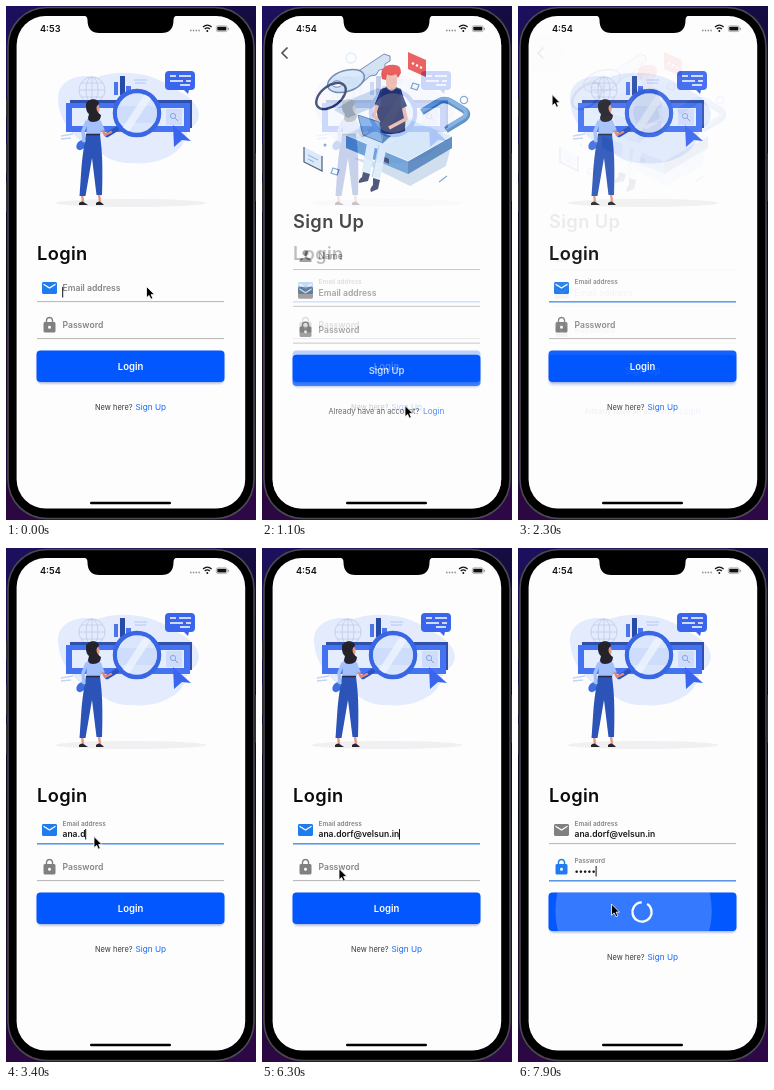
An HTML page that plays this animation: 250 by 514 pixels, repeating every 8 s.

```html
<!DOCTYPE html>
<html lang="en">
<head>
<meta charset="utf-8">
<title>Login flow</title>
<style>
html, body { margin: 0; width: 100%; height: 100%; overflow: hidden; background: #160a35; }
svg { display: block; width: 100%; height: 100%; }
text { font-family: Inter, Roboto, sans-serif; white-space: pre; }
.title { font-size: 18.3px; font-weight: 600; letter-spacing: .35px; fill: #0b0b0d; }
.label { font-size: 8.6px; font-weight: 600; fill: #858585; }
.value { font-size: 8.5px; font-weight: 600; fill: #17171a; }
.cta { font-size: 9.5px; font-weight: 600; fill: #fff; text-anchor: middle; }
.note { font-size: 7.45px; fill: #38383c; }
.link { font-size: 8.2px; fill: #1767f2; }
</style>
</head>
<body>
<svg viewBox="0 0 250 514">
<defs>
  <linearGradient id="wall" x2=".2" y2="1">
    <stop stop-color="#1d1060"/><stop offset=".5" stop-color="#0a0616"/><stop offset="1" stop-color="#2e0846"/>
  </linearGradient>
  <filter id="soft" x="-10%" y="-30%" width="120%" height="160%"><feGaussianBlur stdDeviation="1"/></filter>
  <clipPath id="screenClip"><rect x="10.6" y="10" width="228.6" height="492.5" rx="29"/></clipPath>
  <clipPath id="buttonClip"><rect id="buttonClipBox" x="30.5" y="344.5" width="188" rx="4"/></clipPath>
  <clipPath id="lens"><circle cx="131" cy="107" r="20"/></clipPath>
</defs>

<rect width="250" height="514" fill="url(#wall)"/>
<rect x="2" y="1.5" width="246" height="511" rx="39" fill="#000" stroke="#4a4a50" stroke-width="1.6"/>
<path d="M.8 94v17M.8 137v30M.8 176v30M249.2 147v48" stroke="#2c2c32" stroke-width="1.6"/>
<rect x="10.6" y="10" width="228.6" height="492.5" rx="29" fill="#fdfdfe"/>

<g clip-path="url(#screenClip)">
<g id="login">
  <!-- search illustration -->
  <path d="M52 92C52 74 72 67 92 71C112 63 148 66 166 82C197 94 200 116 181 124C181 147 152 160 126 157C104 158 95 146 84 140C66 132 52 112 52 92Z" fill="#e3ebfc"/>
  <ellipse cx="125" cy="197" rx="75" ry="4" fill="#f0f0f2"/>
  <g fill="none" stroke="#c2d0ec" stroke-width=".9">
    <circle cx="86" cy="84" r="13"/><ellipse cx="86" cy="84" rx="6" ry="13"/>
    <path d="M73 84h26M86 71v26M75 77h22M75 91h22"/>
  </g>
  <path d="M55 130l12-2M55 133l10-1M128 74h13M129 77h11" stroke="#c2d4f7" stroke-width="1.6"/>
  <path d="M108 76h4v13h-4zM120 80h5v9h-5z" fill="#4a76ec"/>
  <path d="M114 70h5v19h-5z" fill="#284aa8"/>
  <rect x="64" y="94" width="122" height="28" fill="#3050ae"/>
  <rect x="60" y="97" width="124" height="29" fill="#4472f2"/>
  <rect x="66" y="102" width="112" height="18" fill="#e4edfe"/>
  <rect x="160" y="103" width="16" height="16" fill="#cfdcfb"/>
  <path d="M169 112l3 3" stroke="#7f9ee6"/><circle cx="167" cy="110" r="2.6" fill="none" stroke="#7f9ee6" stroke-width=".9"/>
  <path d="M163 65h22q4 0 4 4v11q0 4-4 4h-2l-1 4-4-4h-15q-4 0-4-4v-11q0-4 4-4z" fill="#3a66ee"/>
  <path d="M164 70h6M173 70h12M164 75h13M180 75h5M174 79h10" stroke="#fff" stroke-width="1.7"/>
  <path d="M167 119L185 135L176 134L168 141Z" fill="#3a66ee"/>
  <path d="M114 121L101 129" stroke="#2c52bd" stroke-width="4.5" stroke-linecap="round"/>
  <circle cx="131" cy="107" r="22" fill="#dbe6fd" stroke="#3866e4" stroke-width="4.5"/>
  <g clip-path="url(#lens)">
    <path d="M108 100h46v17h-46z" fill="#cfddfc"/>
    <path d="M114 126l26-40h9l-26 40z" fill="#eff5ff" opacity=".8"/>
  </g>
  <path d="M78 134c-6 0-9 5-7 9q4 3 8-2z" fill="#3d6de0"/>
  <path d="M76 188l1 8M93 188l1 8" stroke="#e79a83" stroke-width="2.4"/>
  <path d="M80 128Q76 150 75 168L73.500 190H79.500L86 152L90.500 189H96Q97 160 95.500 142L94 128Z" fill="#2c54b8"/>
  <path d="M73 197q3-3 6 0l3 2h-9zM90 197q3-3 6 0l2 2h-8z" fill="#28242b"/>
  <path d="M81 113q7-3 13 0l1 15H80.500z" fill="#a4c0fa"/>
  <path d="M81 115L77 125L78 136" fill="none" stroke="#a4c0fa" stroke-width="3.4"/>
  <path d="M93 115L97 125" stroke="#a4c0fa" stroke-width="3.8"/>
  <path d="M97 125L99 129L105 126" fill="none" stroke="#e08a76" stroke-width="2.5" stroke-linecap="round" stroke-linejoin="round"/>
  <path d="M80 128.500h14" stroke="#222a44" stroke-width="1.500"/>
  <ellipse cx="90" cy="103" rx="3.600" ry="5.500" fill="#e79a83"/>
  <path d="M80 100C79 92 93 91 93 98C89 100 90 106 95 109Q95 116 87 116Q80 116 83 108Q80 106 80 100Z" fill="#24232a"/>

  <text class="title" x="31" y="254">Login</text>
  <g id="loginFields"></g>
  <rect id="buttonShade" x="31.500" y="346" width="186" rx="4" fill="#002a8a" opacity=".35" filter="url(#soft)"/>
  <g clip-path="url(#buttonClip)">
    <rect x="30" y="344" width="189" height="41" fill="#0257fe"/>
    <circle id="ripple" fill="#fff" opacity=".2"/>
  </g>
  <text id="cta" class="cta" x="124.500" y="363.500">Login</text>
  <circle id="loader" cx="124" cy="364" r="9.600" fill="none" stroke="#fff" stroke-width="2.300"/>
  <g id="loginNote"><text class="note" x="89" y="403.700">New here?</text><text class="link" x="129.500" y="403.800">Sign Up</text></g>
</g>

<g id="signup">
  <rect x="10" y="10" width="230" height="493" fill="#fdfdfe"/>
  <circle id="backRipple" cx="26" cy="47.500" r="19" fill="#f0f0f1"/>
  <path d="M25.500 41.500l-5.500 5.500 5.500 5.500" fill="none" stroke="#111" stroke-width="1.600"/>
  <!-- security illustration -->
  <path d="M72 104l14 8 24-10 14-12-8-8-24 10zM92 152l56 28 36-20 4-16-50 16z" fill="#c0d3e8"/>
  <path d="M92 68L122 48l6 2v5l-5 3v5l-6 1-3 5-6 1-9 8z" fill="#c5daf1" stroke="#47699c"/>
  <ellipse cx="84" cy="75" rx="19" ry="10.500" transform="rotate(-18 84 75)" fill="#cfe2f7" stroke="#47699c" stroke-width="1.500"/>
  <ellipse cx="75" cy="78" rx="5" ry="3.200" fill="#fdfdfe" stroke="#47699c"/>
  <ellipse cx="69" cy="90" rx="17" ry="10" transform="rotate(-38 69 90)" fill="none" stroke="#17224e" stroke-width="2.400"/>
  <path d="M160 106L176 96Q182 92 189 96L202 104Q208 108 202 113L184 124" fill="none" stroke="#326eaf" stroke-width="6.500"/>
  <path d="M160 105L176 95Q182 91 189 95L202 103Q206 107 202 111L184 122" fill="none" stroke="#5c99da" stroke-width="4"/>
  <path d="M84 129L146 155L190 130V142L146 168L84 142Z" fill="#4b89ce"/>
  <path d="M146 155L190 130V142L146 168Z" fill="#2f69ad"/>
  <path d="M84 129L128 106L190 130L146 155Z" fill="#d3e6fa" stroke="#eaf4ff"/>
  <path d="M119 149l8 4v5l-8-4z" fill="#17224e"/>
  <g fill="none" stroke="#d6e8fb" stroke-width="8.500" stroke-linejoin="round">
    <path d="M131 125L110 133L104 167"/>
    <path d="M136 127L121 138L114 172"/>
  </g>
  <path d="M117 139L110 171" stroke="#8db9e6" stroke-width=".8"/>
  <path d="M101 166l7 2-2 7-9 2q-1-3 3-6zM111 172l7 2-2 9-7 3q-2-3 2-7z" fill="#17224e"/>
  <path d="M119 83q11-5 20 0 6 18 4 42-13 6-27 1 1-14-3-28z" fill="#171f50"/>
  <path d="M116 97L112 109L117 117M141 99L144 113L127 122" fill="none" stroke="#f2b29f" stroke-width="3.600" stroke-linejoin="round"/>
  <path d="M119 83L113 98l6 3zM138 83l7 17-6 3z" fill="#222d67"/>
  <path d="M96 109l21 7 4 21-20-8z" fill="#6fa3df" stroke="#366eac"/>
  <path d="M121 137l8-7-9-3z" fill="#366eac"/>
  <path d="M124 68h11v9q-1 8-6 8-5-2-5-8z" fill="#f2b29f"/>
  <path d="M120 73q-3-12 7-14 13-2 12 8l-3 5-2-4q-6 3-9 0l-1 6z" fill="#e02a2a"/>
  <path d="M146 46l18 8v17l-18-8z" fill="#e42d2d"/>
  <path d="M150 57l2 1M154 59l2 1M158 61l2 1" stroke="#fff" stroke-width="2"/>
  <path d="M42 141l18 9v15l-18-9z" fill="#cfe2f7"/>
  <path d="M42 141v15l18 9v-15" fill="none" stroke="#17224e" stroke-width="1.200"/>
  <path d="M46 149l10 5M46 153l6 3" stroke="#5c99da"/>
  <g fill="none" stroke="#5c8fc9" stroke-width="1.300">
    <circle cx="89" cy="52" r="5" stroke="#d7e7f9"/><circle cx="202" cy="94" r="3.600"/>
    <path d="M151 77l6 2-2 5-6-2zM71 162l6 2-2 5-6-2zM177 176l8-6"/>
  </g>
  <circle cx="63" cy="139" r="1.500" fill="#5c8fc9"/>

  <text class="title" x="31" y="222">Sign Up</text>
  <g id="signupFields"></g>
  <rect x="31.500" y="350" width="186" height="31" rx="4" fill="#002a8a" opacity=".35" filter="url(#soft)"/>
  <rect x="30.500" y="348.700" width="188" height="31.300" rx="4" fill="#0257fe"/>
  <text class="cta" x="124.500" y="367.700">Sign Up</text>
  <text class="note" x="66.500" y="408">Already have an account?</text><text class="link" x="161" y="408.200">Login</text>
</g>
</g>

<path d="M77 9.500q4.500 0 4.500 4.500q0 13 12 13h62q12 0 12-13q0-4.500 4.500-4.500z" fill="#000"/>
<text id="clock" x="34" y="25.700" font-size="9.200" font-weight="600" fill="#111"></text>
<path d="M184 24.500h10" stroke="#8d8d8d" stroke-width="1.400" stroke-dasharray="1.500 1.300"/>
<path d="M197 21q4.300-3.700 8.600 0M198.700 23q2.600-2.200 5.200 0" fill="none" stroke="#111" stroke-width="1.300"/>
<circle cx="201.300" cy="25" r="1" fill="#111"/>
<rect x="210.300" y="19.800" width="11" height="5.800" rx="1.700" fill="none" stroke="#999" stroke-width=".7"/>
<rect x="211.300" y="20.800" width="9" height="3.800" rx=".8" fill="#111"/>
<path d="M222.600 21.800v2" stroke="#999"/>
<rect x="84" y="495.800" width="81" height="2.400" rx="1.200" fill="#000"/>
<path id="mouse" d="M0 0V11.200L2.600 8.900L4.400 12.700L6.300 11.800L4.600 8.100H8Z" fill="#000" stroke="#fff" stroke-width=".8"/>
</svg>

<script>
const LOOP = 8000, GREY = '#808080', BLUE = '#1e7cf0';
const EMAIL = 'ana.dorf@velsun.in';
const EMAIL_KEYS = [2900, 3020, 3140, 3250, 3360, 3700, 3880, 4050, 4400, 4500, 4600, 4750, 4900, 5000, 5120, 5250, 5380, 5490];
const PASS_KEYS = [6680, 6800, 6930, 7050, 7160];
// time, x, y
const MOUSE = [[0, 140.5, 280.5], [150, 140.5, 280.5], [620, 143, 399.5], [1150, 143, 399.5], [1750, 24, 51],
  [2150, 24, 51], [2750, 88, 288.5], [5700, 88, 288.5], [6200, 77, 320.5],
  [7220, 77, 320.5], [7500, 93.5, 356], [LOOP, 93.5, 356]];
const ICONS = {
  mail: 'M20 4H4c-1.1 0-2 .9-2 2v12c0 1.1.9 2 2 2h16c1.1 0 2-.9 2-2V6c0-1.1-.9-2-2-2zm0 4l-8 5-8-5V6l8 5 8-5v2z',
  lock: 'M18 8h-1V6c0-2.76-2.24-5-5-5S7 3.24 7 6v2H6c-1.1 0-2 .9-2 2v10c0 1.1.9 2 2 2h12c1.1 0 2-.9 2-2V10c0-1.1-.9-2-2-2zm-6 9c-1.1 0-2-.9-2-2s.9-2 2-2 2 .9 2 2-.9 2-2 2zm3.1-9H8.9V6c0-1.71 1.39-3.1 3.1-3.1s3.1 1.39 3.1 3.1v2z',
  person: 'M12 12c2.21 0 4-1.79 4-4s-1.79-4-4-4-4 1.79-4 4 1.79 4 4 4zm0 2c-2.67 0-8 1.34-8 4v2h16v-2c0-2.66-5.33-4-8-4z'
};

const $ = id => document.getElementById(id);
const set = (el, attrs) => { for (const k in attrs) el.setAttribute(k, attrs[k]); };
const ramp = (t, a, b) => {
  const p = Math.min(1, Math.max(0, (t - a) / (b - a)));
  return p * p * (3 - 2 * p);
};

function addField(parent, y, label, icon) {
  const g = document.createElementNS('http://www.w3.org/2000/svg', 'g');
  g.innerHTML = `<path d="${ICONS[icon]}" transform="translate(34.5 ${y - 9}) scale(.75)" fill="${GREY}"/>
    <path d="M31 ${y + 13.6}h187" stroke="#b4b4b6"/>
    <path d="M31 ${y + 13.9}h187" stroke="#3f8df3" stroke-width="1.3" opacity="0"/>
    <text class="label">${label}</text>
    <text class="value" x="56.5" y="${y + 7.3}"></text>
    <rect y="${y - 1}" width="1" height="10.5" fill="#111" opacity="0"/>`;
  parent.append(g);
  const [glyph, , line, caption, value, caret] = g.children;
  const update = (text, focus, float, caretOn) => {
    set(glyph, { fill: focus > 0 ? BLUE : GREY });
    set(line, { opacity: focus });
    set(caption, { transform: `translate(56.5 ${y + 3.1 - 7.1 * float}) scale(${1 - .25 * float})` });
    value.textContent = text;
    set(caret, { x: 56.2 + (text ? value.getComputedTextLength() : 0), opacity: caretOn ? 1 : 0 });
  };
  update('', 0, 0, false);
  return update;
}

const email = addField($('loginFields'), 282, 'Email address', 'mail');
const password = addField($('loginFields'), 319, 'Password', 'lock');
addField($('signupFields'), 250, 'Name', 'person');
addField($('signupFields'), 286.7, 'Email address', 'mail');
addField($('signupFields'), 323.5, 'Password', 'lock');

function mouseAt(t) {
  const i = MOUSE.findIndex((m, n) => n && t <= m[0]);
  const [a, x, y] = MOUSE[i - 1], [b, u, v] = MOUSE[i], p = ramp(t, a, b);
  return [x + (u - x) * p, y + (v - y) * p];
}

function draw(t) {
  const typed = keys => keys.filter(k => k <= t).length;
  const float = ramp(t, 20, 190), passFocus = ramp(t, 6400, 6560);
  const emailFocus = Math.max(.001, float) * (1 - passFocus);
  const emailCaret = t < 6400 && (t < 450 || t > 2800);
  email(EMAIL.slice(0, typed(EMAIL_KEYS)), emailFocus, float, emailCaret);
  password('•'.repeat(typed(PASS_KEYS)), passFocus, passFocus, t >= 6450);

  const page = ramp(t, 900, 1200) * (1 - ramp(t, 2050, 2350));
  set($('signup'), { opacity: page, visibility: page ? 'visible' : 'hidden' });
  set($('backRipple'), { opacity: ramp(t, 1820, 1970) });
  $('clock').textContent = t < 400 ? '4:53' : '4:54';

  const busy = t >= 7600, height = busy ? 38.5 : 31.5;
  set($('buttonClipBox'), { height });
  set($('buttonShade'), { height });
  set($('cta'), { opacity: busy ? 0 : 1 });
  set($('loginNote'), { transform: `translate(0 ${busy ? 8 : 0})` });

  const spread = Math.max(0, (t - 7540) / 360);
  set($('ripple'), { cx: 94 + 21.5 * spread, cy: 358 + 5 * spread, r: 78 * spread });
  const round = 2 * Math.PI * 9.6, arc = .9 * ramp(t, 7560, 7900) * round;
  set($('loader'), {
    opacity: busy ? 1 : 0,
    'stroke-dasharray': `${arc} ${round}`,
    transform: `rotate(${-58 + (t - 7900) * .2} 124 364)`
  });
  set($('mouse'), { transform: `translate(${mouseAt(t)})` });
}

(function tick() {
  draw(performance.now() % LOOP);
  requestAnimationFrame(tick);
})();
</script>
</body>
</html>
```
